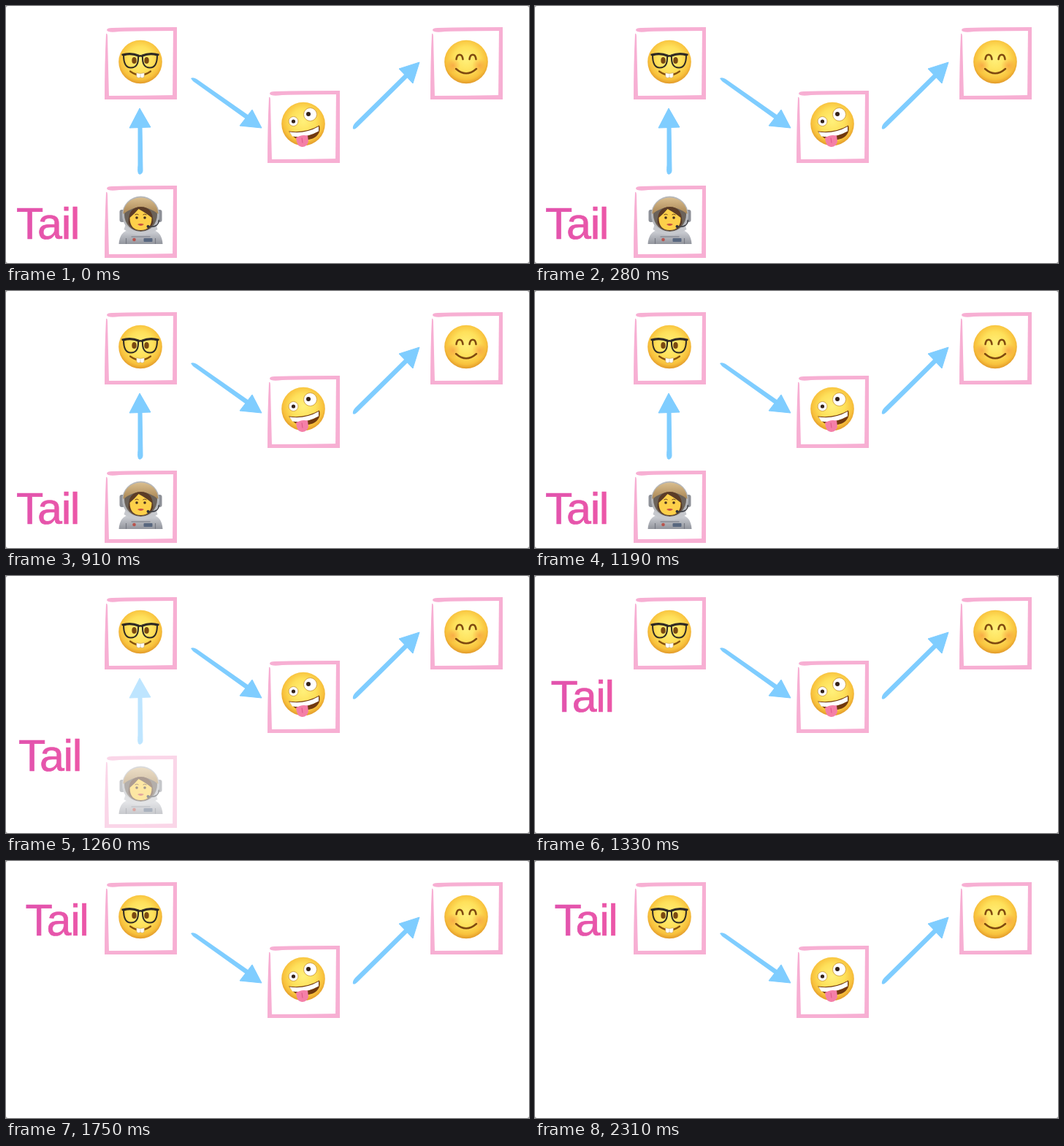
Write an HTML page that moves like this. It is 716 by 352 pixels and loops after 2.38 s.

```html
<!DOCTYPE html>
<html lang="en">
<head>
<meta charset="utf-8">
<title>Tail moves to the previous node</title>
<style>
  html, body { margin: 0; width: 100%; height: 100%; overflow: hidden; background: #999; }
  svg { display: block; width: 716px; height: 352px; }
  text {
    font: 61px "Liberation Sans", Arial, sans-serif; letter-spacing: -1.4px;
    fill: url(#label); stroke: url(#label); stroke-width: .7px;
  }
</style>
</head>
<body>
<svg viewBox="0 0 716 352">
  <defs>
    <linearGradient id="label" x2="1" y2="0">
      <stop offset="0" stop-color="#e153ae"/><stop offset="1" stop-color="#ec57a8"/>
    </linearGradient>
    <radialGradient id="skin" cx=".5" cy=".44" r=".58">
      <stop offset="0" stop-color="#fff07a"/><stop offset=".5" stop-color="#fee05a"/>
      <stop offset=".8" stop-color="#f8c13c"/><stop offset="1" stop-color="#dd9126"/>
    </radialGradient>
    <radialGradient id="blush">
      <stop offset="0" stop-color="#f58a3c" stop-opacity=".55"/><stop offset="1" stop-color="#f58a3c" stop-opacity="0"/>
    </radialGradient>
    <linearGradient id="suit" x2="0" y2="1">
      <stop offset="0" stop-color="#d5d7dc"/><stop offset="1" stop-color="#92959d"/>
    </linearGradient>
    <linearGradient id="visor" x2="0" y2="1">
      <stop offset="0" stop-color="#d9bd8e"/><stop offset="1" stop-color="#a98654"/>
    </linearGradient>

    <g id="frame" fill="#f7afd3">
      <path d="M3 5Q3 2 10 2Q50 1 99 1V6Q50 6 20 7Q4 9 3 5Z"/>
      <path d="M94 1H99V100H93Z"/>
      <path d="M0 95Q50 95 99 94V100H0Z"/>
      <path d="M2 10Q4 9 4 15L6 97 0 100Q0 50 2 10Z"/>
    </g>
    <circle id="head" r="29.8" fill="url(#skin)"/>

    <g id="nerd">
      <use href="#head"/>
      <g fill="#7a4a12"><ellipse cx="-8.5" cy="-2" rx="3.2" ry="4.6"/><ellipse cx="8.5" cy="-2" rx="3.2" ry="4.6"/></g>
      <path d="M-14 13Q0 23 14 13" fill="none" stroke="#84500f" stroke-width="2.2" stroke-linecap="round"/>
      <path d="M-5.5 15Q0 17 5.5 15L5 21Q2 23 0 21Q-2 23-5 21Z" fill="#fff" stroke="#c9a35a" stroke-width=".6"/>
      <path d="M0 17V21" stroke="#bbb" stroke-width=".6"/>
      <g id="lens" fill="none" stroke="#2f2a25" stroke-width="2">
        <path d="M-23-9Q-13-12-3-8Q-2 8-13 8Q-23 8-23-9Z"/>
        <path d="M-25.5-9.5Q-13-13-2-8.5" stroke-width="2.8"/>
      </g>
      <use href="#lens" transform="scale(-1 1)"/>
      <path d="M-3-7.5Q0-9 3-7.5" fill="none" stroke="#2f2a25" stroke-width="2.6"/>
    </g>

    <g id="wild">
      <use href="#head"/>
      <g fill="#fff" stroke="#c8933a" stroke-width=".8">
        <circle cx="-13.5" cy="-3.5" r="6.5"/><circle cx="9.5" cy="-13" r="9"/>
      </g>
      <g fill="#35231a"><circle cx="-13.5" cy="-3.5" r="2.6"/><circle cx="7" cy="-13.5" r="3"/></g>
      <path d="M-20 10Q3 13 22 2Q25 14 13 20Q-9 28-20 10Z" fill="#71390f"/>
      <path d="M-19 11Q3 14 21 3.5L21 10Q3 20-15 17Z" fill="#fff"/>
      <path d="M-10 19Q-3 14 6 16L7 24Q5 32-2 31.5Q-9 31-10 19Z" fill="#f47fa8"/>
      <path d="M-2 19L-1 26" stroke="#dd5a8a" stroke-width="1.1"/>
    </g>

    <g id="smile">
      <use href="#head"/>
      <g fill="url(#blush)"><circle cx="-18" cy="5" r="10"/><circle cx="18" cy="5" r="10"/></g>
      <path d="M-13.5-3.5C-12.5-12-5.5-12-4.5-3.5M4.5-3.5C5.5-12 12.5-12 13.5-3.5M-14 9.5Q0 22 14 9.5" fill="none" stroke="#7f4a10" stroke-width="2.5" stroke-linecap="round"/>
    </g>

    <g id="astronaut">
      <path d="M-30 33Q-29 16-15 13H15Q29 16 30 33Z" fill="url(#suit)"/>
      <path d="M-20 33V25M20 33V25M-13 23H13" stroke="#777a83" stroke-width="1.2"/>
      <g fill="#8d9097"><rect x="-29" y="-14" width="7" height="17" rx="3"/><rect x="22" y="-14" width="7" height="17" rx="3"/></g>
      <ellipse cy="-7" rx="25.5" ry="25.5" fill="#b5b7bb"/>
      <ellipse cy="-7" rx="22.5" ry="23" fill="#6b6259"/>
      <path d="M-24-8C-23-38 23-38 24-8Q0-27-24-8Z" fill="url(#visor)"/>
      <path d="M-17 4Q-17-18 0-18Q17-18 17 4Q14 14 0 15Q-14 14-17 4Z" fill="#5b3c27"/>
      <path d="M-15-3Q-8-9-3-15Q8-9 15-3Q15 14 0 14Q-15 14-15-3Z" fill="#fdd04a"/>
      <g fill="#47301f"><circle cx="-5.5" cy="-3" r="1.8"/><circle cx="5.5" cy="-3" r="1.8"/></g>
      <path d="M-8-7Q-5-9-3-7M3-7Q5-9 8-7" fill="none" stroke="#6d431d"/>
      <path d="M-4.5 6Q0 4 4.5 6Q0 10-4.5 6Z" fill="#c94f40"/>
      <path d="M-21 7Q0 25 21 7L23 13Q0 29-23 13Z" fill="#c6c8cd"/>
      <path d="M25 0Q24 11 11 9" fill="none" stroke="#3f4147" stroke-width="1.5"/>
      <circle cx="10" cy="9" r="2" fill="#303238"/>
      <rect x="4" y="25" width="12" height="5" rx="1" fill="#58677f"/>
      <circle cx="-9" cy="27" r="2.3" fill="#b9544d"/>
    </g>
  </defs>

  <rect width="716" height="352" rx="3" fill="#fff"/>

  <use href="#frame" x="135" y="28"/><use href="#nerd" x="184" y="76.5"/>
  <use href="#frame" x="358" y="115"/><use href="#wild" x="407" y="161.5"/>
  <use href="#frame" x="581" y="28"/><use href="#smile" x="630" y="76.5"/>
  <g fill="#7fcdff">
    <path d="M253 99Q256 97 261 100L334 151 330 156 256 103Z"/>
    <path d="M475 168Q474 164 479 159L547 92 551 97 481 166Q477 170 475 168Z"/>
    <path d="M337 142L350 167 320 164ZM538 86L566 77 557 106Z" stroke="#7fcdff" stroke-linejoin="round"/>
  </g>

  <g id="oldNode">
    <use href="#frame" x="135" y="245"/><use href="#astronaut" x="184.5" y="293"/>
    <path d="M181 165H186L187 226Q186 231 182 230Q180 228 181 218ZM183 140L198 166 169 167Z" fill="#7fcdff" stroke="#7fcdff" stroke-linejoin="round"/>
  </g>
  <text id="tail">Tail</text>
</svg>
<script>
  const LOOP = 2380, STEP = 70;
  const tail = document.getElementById("tail");
  const oldNode = document.getElementById("oldNode");
  const progress = (time, start, end) => Math.min(1, Math.max(0, (time - start) / (end - start)));

  function draw(now) {
    const time = Math.floor((now % LOOP) / STEP) * STEP;
    const p = progress(time, 1190, 1470);
    const eased = (1 - Math.cos(Math.PI * p ** 0.81)) / 2;
    tail.setAttribute("transform", `translate(${14 + 12.5 * eased} ${318.5 - 217 * eased})`);
    oldNode.setAttribute("opacity", 1 - progress(time, 1190, 1330));
    requestAnimationFrame(draw);
  }
  draw(0);
</script>
</body>
</html>
```
